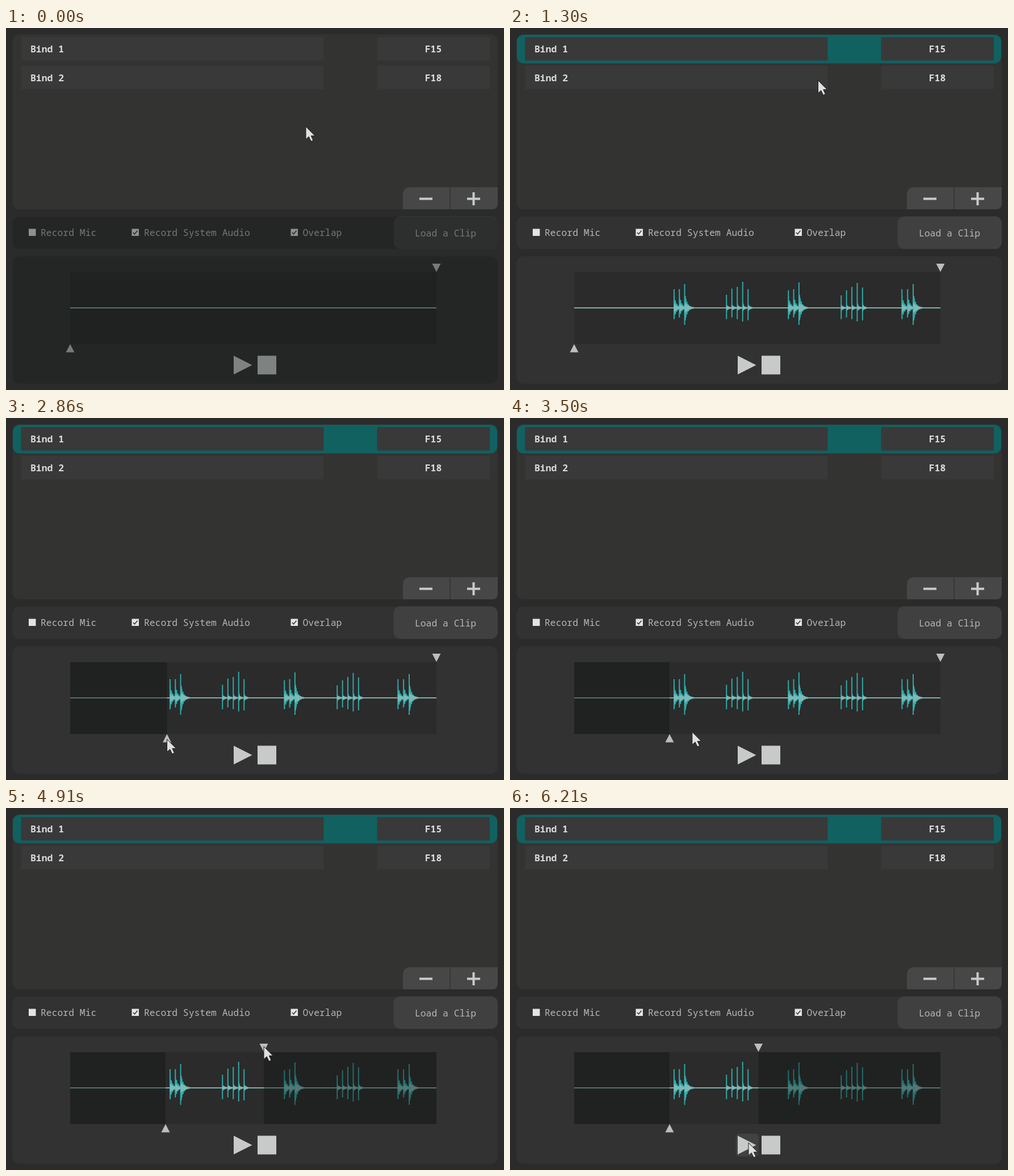
An HTML page that plays this animation: 877x639 px, repeating every 6.24 s.

```html
<!DOCTYPE html>
<html lang="en">
<head>
<meta charset="utf-8">
<title>Sound binds</title>
<style>
  html, body { margin: 0; width: 100%; height: 100%; overflow: hidden; background: #2b2b2b; }
  svg { display: block; width: 877px; height: 639px; }
  text { font: 500 16.4px "Noto Sans Mono", "DejaVu Sans Mono", monospace; fill: #b6b8b4; white-space: pre; }
  .bind text { font-weight: 600; fill: #dcdcdc; }
  .field { fill: #393939; }
  .panel { fill: #323232; }
  .icon { fill: #c8caca; }
  .mark { fill: #bcbebe; }
  .shade { fill: #101413; fill-opacity: .4; }
</style>
</head>
<body>
<svg viewBox="0 0 877 639">
  <rect x="11.5" y="11" width="854.5" height="309" rx="12" fill="#333331"/>
  <rect id="row" x="12" y="12" width="853" height="50.5" rx="12" fill="#116160"/>
  <g class="bind">
    <rect class="field" x="26.5" y="16" width="533" height="41.5" rx="2"/>
    <rect class="field" x="653.5" y="16" width="198.5" height="41.5" rx="2"/>
    <text x="43" y="43">Bind 1</text>
    <text x="752.5" y="43" text-anchor="middle">F15</text>
  </g>
  <g class="bind">
    <rect class="field" x="26.5" y="66.5" width="533" height="42" rx="2"/>
    <rect class="field" x="653.5" y="66.5" width="198.5" height="42" rx="2"/>
    <text x="43" y="93.5">Bind 2</text>
    <text x="752.5" y="93.5" text-anchor="middle">F18</text>
  </g>
  <g fill="#474747">
    <path d="M699 320V295Q699 281 713 281H781.5V320Z"/>
    <path d="M783 281H866V310Q866 320 856 320H783Z"/>
  </g>
  <path d="M728 301.5H751M812 301.5H835M823.5 290V313" stroke="#c8cccb" stroke-width="4"/>

  <rect class="panel" x="11.5" y="333" width="854.5" height="57" rx="12"/>
  <rect x="682.5" y="332.5" width="183.5" height="57.5" rx="12" fill="#404040"/>
  <g fill="#e4e4e2">
    <rect x="40" y="354.5" width="12.5" height="12.5"/>
    <rect x="221.5" y="354.5" width="12.5" height="12.5"/>
    <rect x="501.5" y="354.5" width="12.5" height="12.5"/>
  </g>
  <path d="M224 361l2.5 2.800 5-6M504 361l2.500 2.800 5-6" fill="none" stroke="#3a3a3a" stroke-width="1.600"/>
  <text x="61" y="366.500">Record Mic</text>
  <text x="243" y="366.500">Record System Audio</text>
  <text x="522.500" y="366.500">Overlap</text>
  <text x="774" y="368" text-anchor="middle">Load a Clip</text>

  <rect class="panel" x="11.5" y="403" width="854.5" height="225" rx="12"/>
  <rect x="113" y="431" width="645" height="127" fill="#2b2b2b"/>
  <g id="wave">
    <path id="peaks" fill="#2eaeac"/>
    <path id="body" fill="#7fbab8"/>
  </g>
  <rect x="113" y="493.100" width="645" height="1.900" fill="#85b5b2"/>
  <rect id="before" class="shade" x="113" y="431" height="127"/>
  <rect id="after" class="shade" y="431" height="127"/>
  <path id="start" class="mark" d="M0 558l7.500 14.500h-15z"/>
  <path id="end" class="mark" d="M0 430.500l7.500-14.500h-15z"/>
  <rect id="hover" x="398" y="575" width="40" height="40" rx="5" fill="#414141"/>
  <path class="icon" d="M401 578.500L433.500 595 401 611.500Z"/>
  <rect class="icon" x="443" y="578.500" width="33" height="33"/>

  <g id="disabled" class="shade">
    <rect x="11.5" y="333" width="854.5" height="57" rx="12"/>
    <rect x="11.5" y="403" width="854.5" height="225" rx="12"/>
  </g>
  <path id="cursor" d="M0 0V22.500L5.200 17.800 9.200 26 13 24.200 9.300 16.300H16Z"
        fill="#e0e0e0" stroke="#1c1c1c" stroke-width="1" stroke-linejoin="round"/>
</svg>
<script>
const LOOP = 6240, LEFT = 113, RIGHT = 758, MID = 494;
const SELECT = 550, ENABLE = 790;
const GRAB_START = 2080, DROP_START = 3300, GRAB_END = 4250, DROP_END = 5400;
const el = id => document.getElementById(id);
const clamp = (v, lo, hi) => Math.min(hi, Math.max(lo, v));

// Pointer stops: time, x, y.
const stops = [
  [0, 528, 174], [100, 528, 174], [520, 599, 31], [1130, 599, 31],
  [1940, 107, 566], [2100, 107, 566], [2760, 283.5, 567], [2900, 283.5, 567],
  [3200, 281, 567], [3380, 281, 567], [4060, 757, 415], [4250, 757, 415],
  [4880, 454, 421], [5000, 454, 421], [5250, 437.5, 421], [5520, 437.5, 421],
  [6190, 420, 591], [LOOP, 420, 591]
];

function pointerAt(t) {
  const i = stops.findIndex(s => s[0] > t);
  const [t0, x0, y0] = stops[i - 1], [t1, x1, y1] = stops[i];
  const p = (t - t0) / (t1 - t0), k = p * p * (3 - 2 * p);
  return [x0 + (x1 - x0) * k, y0 + (y1 - y0) * k];
}

// Each burst: first hit, spacing, rise of each hit, fall of each hit, long tail or not.
const drum = [20, 17, 30], clicks = [20, 17, 20, 24, 22];
const bursts = [
  [288, 9.3, [33, 33, 42], drum, true],
  [380.3, 9.5, [23, 34, 37, 46, 33], clicks, false],
  [489.3, 9.3, [31, 33, 45], drum, true],
  [582.3, 9.4, [22, 31, 37, 44, 36], clicks, false],
  [689.3, 9.9, [33, 33, 42], drum, true]
];

function drawWave() {
  let peaks = '', body = '';
  const bar = (x, w, up, down) =>
    `M${x.toFixed(1)} ${(MID - up).toFixed(1)}h${w}V${(MID + down).toFixed(1)}h${-w}Z`;
  for (const [x0, gap, ups, downs, long] of bursts) {
    ups.forEach((up, i) => {
      const x = x0 + i * gap, down = downs[i], last = i === ups.length - 1;
      peaks += bar(x, 1.9, up, down);
      const length = last ? (long ? 17 : 9) : gap;
      for (let d = 1; d < length; d++) {
        const ripple = 1 + .15 * Math.sin(d * 2.4 + i);
        const fade = Math.exp(-d / (long ? 4.2 : 1.5)) * ripple;
        const scale = long ? .75 : .5;
        peaks += bar(x + d, 1.1, up * fade * scale, down * fade * (long ? 1.1 : .6));
        const core = (long ? (last ? 10 : 8) : 5) * Math.exp(-d / (last && long ? 8 : 6)) * ripple;
        body += bar(x + d, 1.1, core, core);
      }
    });
  }
  el('peaks').setAttribute('d', peaks);
  el('body').setAttribute('d', body);
}

const show = (id, on) => { el(id).style.display = on ? '' : 'none'; };
const moveTo = (id, x, y = 0) => el(id).setAttribute('transform', `translate(${x} ${y})`);

// While held, a handle follows the pointer; afterwards it keeps the drop position.
function handleAt(t, grab, drop, rest) {
  return t < grab ? rest : clamp(pointerAt(Math.min(t, drop))[0], LEFT, RIGHT);
}

function draw(t) {
  const [x, y] = pointerAt(t);
  const start = t < 2100 ? LEFT : handleAt(t, GRAB_START, DROP_START, LEFT);
  const end = handleAt(t, GRAB_END, DROP_END, RIGHT);
  moveTo('cursor', x, y);
  moveTo('start', start);
  moveTo('end', end);
  el('before').setAttribute('width', start - LEFT);
  el('after').setAttribute('x', end);
  el('after').setAttribute('width', RIGHT - end);
  show('row', t >= SELECT);
  show('wave', t >= ENABLE);
  show('disabled', t < ENABLE);
  show('hover', x > 398 && x < 438 && y > 580);
}

drawWave();
const began = performance.now();
function tick() {
  draw((performance.now() - began) % LOOP);
  requestAnimationFrame(tick);
}
tick();
</script>
</body>
</html>
```
